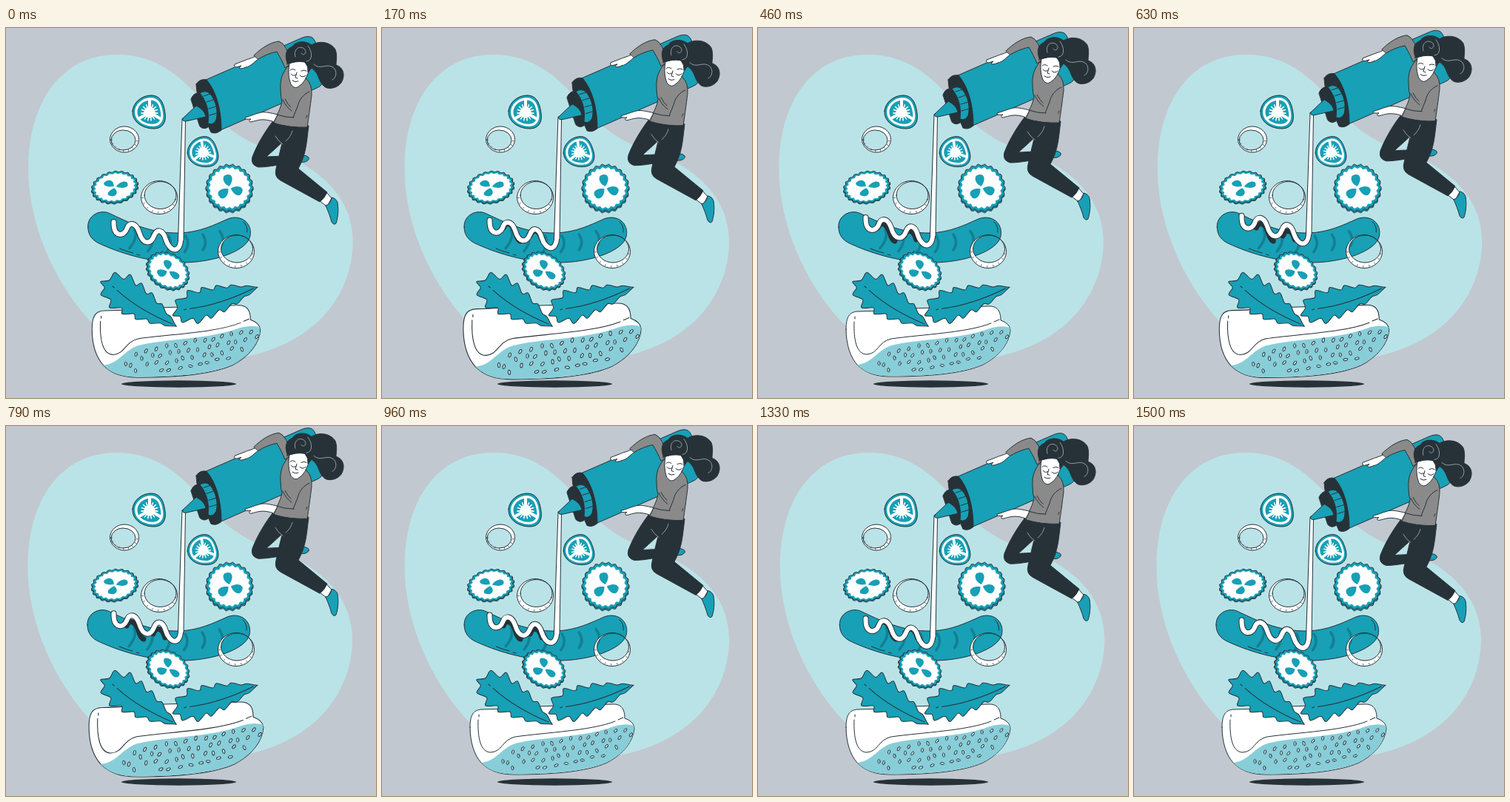
Animation of 500 by 500 pixels, one loop 1.54 s. Source, as an HTML page:

```html
<!DOCTYPE html>
<html lang="en">
<head>
<meta charset="utf-8">
<title>Hot dog</title>
<style>
html, body { margin: 0; width: 100%; height: 100%; overflow: hidden; background: #c2c8cf; }
svg { display: block; width: 100vw; height: 100vh; }
.ink { stroke: #263238; stroke-width: 1; stroke-linecap: round; stroke-linejoin: round; fill: none; }
.t { fill: #18a0b6; }
.w { fill: #fff; }
.d { fill: #263238; }
.g { fill: #8a8a8a; }
.n { stroke: none; }
</style>
</head>
<body>
<svg viewBox="0 0 500 500">
  <path id="blob" fill="#bae3e8" d="M30.5 190C30.5 100 75 36 150 36C205 36 236 66 268 100C288 128 318 152 355 164C425 186 469 230 469 288C469 350 430 420 330 443C240 462 165 450 118 400C70 350 30.5 270 30.5 190Z"/>
  <ellipse class="d" cx="233.5" cy="481" rx="77.5" ry="4.7"/>

  <g id="bun" class="ink">
    <path class="w" d="M119 407C119 391 123 383 136 383C160 383 182 380 205 379L310 376C324 375 328 383 328 395Q340 399 341 408C340 425 327 443 304 455C275 468 225 471 180 471C160 471 146 467 134 455C125 445 119 428 119 407Z"/>
    <path class="n" fill="#88ced9" d="M134 455C155 453 160 436 180 429C215 420 274 421 313 406Q330 401 340.500 405C341 424 327 443 304 454.500C275 467 225 470.500 180 470.500C160 470.500 146 467 134 455Z"/>
    <path d="M130 397C129 421 133 441 147 441C163 440 162 424 180 420C222 414 282 412 315 399"/>
    <path d="M319 397L326 394M131 390V393"/>
    <g id="seeds" fill="#bae3e8"></g>
  </g>

  <g id="sausage" class="ink">
    <path class="t" d="M111 269C110 254 126 245 139 250C165 262 195 278 235 277C262 276 282 266 300 258C318 251 334 264 330 282C325 302 280 317 238 317C190 317 150 302 128 292C116 287 111 279 111 269Z"/>
    <path id="stripes" stroke="#137f92" stroke-width="3.500"/>
    <path stroke-width="7" d="M164 270C167 262 175 262 180 276Q183 287 187 288M200 281C204 271 212 272 216 286"/>
    <path d="M154 298Q163 302 172 304M177 306L181 307M321 262Q327 267 326 276"/>
  </g>

  <g id="leaves" class="ink"></g>
  <g id="slices" class="ink"></g>

  <g id="float">
    <g class="ink">
      <path class="w" stroke-width="2" d="M238.500 123L233 286H239.500L242 123Z"/>
      <path id="sauce" stroke-width="8" d="M145.500 262C145 283 159 282 163 272C166 262 175 262 180 276C185 293 195 293 200 281C204 271 212 272 216 286C221 302 235 306 236.300 285"/>
      <use href="#sauce" id="cream"/>
      <path class="w n" d="M238.500 123L233 287H239.500L242 123Z"/>
    </g>

    <g class="ink">
      <path class="t" d="M270 70L396 15Q408 9 414 13Q419 17 421 30L430 66Q431 77 418 82L290 138C290 110 283 85 270 70Z"/>
      <path class="d" d="M257 76Q262 68 271 70C284 85 291 110 291 138Q284 144 277 141C268 120 258 100 257 76Z"/>
      <path class="d" d="M250 96Q253 87 264 87C273 99 278 116 273 134Q267 138 262 133Z"/>
      <path class="t" d="M262 88Q270 83 276 89C284 99 287 113 284 124Q280 132 273 129C275 112 271 99 262 88Z"/>
      <path d="M267 92L276 89M271 100L280 97M274 109L284 106M275 118L285 115"/>
      <path class="t" d="M239 122L257 105C265 109 269 114 270 120L243 126Q237 126 239 122Z"/>
    </g>

    <g class="ink">
      <path class="t" d="M397 172Q405 171 409 175Q411 178 404 181Q395 182 386 181Z"/>
      <path class="w" d="M381 174L398 172L389 181L378 183Z"/>
      <path class="d" d="M363 123C351 138 340 156 333 174Q330 185 341 188C356 188 372 184 390 181L397 172L352 174L377 151Z"/>
      <path fill="#bae3e8" class="n" d="M372 157C366 163 359 168 354 173Q361 171 368 172Z"/>
      <path class="w" d="M421 231L431 220L440 230L434 241Z"/>
      <path class="t" d="M432 240Q439 238 440 229Q446 230 448 236C450 248 448 258 446 264Q443 267 440 262C438 254 435 247 432 240Z"/>
      <path class="d" d="M363 124L409 132C406 155 406 170 395 190L434 222Q430 231 424 235L371 206Q362 201 365 190Q369 172 373 156Z"/>
      <path stroke="#c2c8cf" stroke-width=".7" d="M374 157Q368 153 364 146M387 139Q385 147 378 153"/>

      <path class="w" d="M341 36C333 41 329 41 322 44L309 49Q307 52 311 53L318 51L315 54Q318 56 324 53C331 52 335 46 342 41Z"/>
      <path class="g" d="M335 37C344 28 357 19 369 18Q380 22 385 48L377 54C374 46 370 39 366 32Q352 35 341 42Z"/>
      <path class="g" d="M384 49C374 58 370 69 371 83Q371 94 373 99C371 109 367 116 361 128Q384 135 407 134C409 122 411 106 413 91Q414 76 406 69L399 57Z"/>
      <path d="M374 97Q378 106 386 112M377 96Q381 104 385 107M410 86C403 89 396 96 394 106L388 121M407 118Q404 127 397 130"/>
      <path class="w" d="M368 117C357 115 349 112 341 115C334 117 330 119 323 121Q322 124 331 123Q326 126 331 127C340 125 346 121 363 127Z"/>
      <path class="g n" d="M367 116L389 121Q398 115 403 105L407 132Q382 135 361 127Z"/>
      <path d="M366 117Q378 121 389 121M367 117L362 128"/>
      <path class="w" d="M383 48C381 60 382 68 385 76Q389 82 394 80Q401 76 404 70L411 55L401 43Z"/>
      <path d="M384 57Q387 54 391 57M399 58Q403 56 406 58M385 62Q388 66 392 63M397 64Q401 68 405 64M393 60L391 67L394 68M387 71Q391 74 395 72"/>
      <path class="d" d="M380 47C377 38 377 29 387 25C391 18 404 16 413 23C422 17 438 18 445 29C448 37 446 45 446 50C456 53 459 64 453 74C447 82 434 84 429 78C421 70 424 62 413 54L408 60Q409 52 404 46Q391 44 380 49Z"/>
      <path stroke="#c2c8cf" stroke-width=".7" d="M391 39C388 29 396 23 403 28C408 33 402 39 399 34M406 45C414 45 415 33 408 24M416 49C425 58 434 46 443 54C448 59 446 68 441 70"/>
    </g>
  </g>
</svg>
<script>
const $ = id => document.getElementById(id);
const { sin, cos, PI, min, max, floor, abs } = Math;
const LOOP = 1540, LEAD = 38;

let seed = 7;
const rnd = () => (seed = seed * 16807 % 2147483647) / 2147483647;
const jit = r => (rnd() * 2 - 1) * r;

// closed smooth curve through a list of [x, y]
function smooth(pts) {
  const n = pts.length, at = i => pts[(i + n) % n];
  let d = `M${at(0)}`;
  for (let i = 0; i < n; i++) {
    const [a, b, c, e] = [at(i - 1), at(i), at(i + 1), at(i + 2)];
    const out = k => b[k] + (c[k] - a[k]) / 6, into = k => c[k] - (e[k] - b[k]) / 6;
    d += `C${out(0)} ${out(1)} ${into(0)} ${into(1)} ${c}`;
  }
  return d + 'Z';
}

// lobed leaf along a straight rib, lobes leaning back to the stem
function leaf(x, y, len, turn, width, lobes) {
  const edge = (u, side, k) => [u * len - 5 * (k > .9) * (1 - u),
    side * k * width * (1 - u ** 2.5) * (.55 + .45 * min(1, 5 * u))];
  const top = [], low = [];
  for (let i = 0; i < lobes; i++) {
    const u = (i + .3) / lobes;
    top.push(edge(u, -1, 1), edge(u + .55 / lobes, -1, .7));
    low.unshift(edge(u + .55 / lobes, 1, .7), edge(u, 1, 1));
  }
  const d = smooth([[-9, 3], [0, -5], ...top, [len, 0], ...low, [0, 7]]);
  return `<g transform="translate(${x} ${y}) rotate(${turn})"><path class="t" d="${d}"/>
    <path d="M8 0h3M16 1Q${len / 2} 8 ${len - 6} 0"/></g>`;
}
$('leaves').innerHTML = leaf(137, 345, 110, 32, 27, 6) + leaf(233, 383, 112, -17, 24, 6);

// staggered rows of seeds that follow the crust
let dots = '';
for (let row = 0; row < 4; row++)
  for (let x = 166 + row % 2 * 6; x < 337; x += 12.5) {
    const px = x + jit(2.5);
    const top = 432 - .18 * (px - 180) + max(0, 180 - px) * .7;
    const base = 465 - 38 * (max(0, px - 230) / 100) ** 2;
    const py = top + 5 + row * 10 + jit(2);
    const turn = row > 2 ? 80 + jit(20) : 10 + jit(35);
    if (py < base) dots += `<ellipse rx="1.500" ry="2.800" stroke-width=".9"
      transform="translate(${px} ${py}) rotate(${turn})"/>`;
  }
$('seeds').innerHTML = dots;

let bars = '';
for (let i = 0; i < 6; i++) {
  const x = 174 + i * 23, y = 281 - 20 * ((x - 235) / 95) ** 2;
  bars += `M${x} ${y}q${5 + i * .6} 11 ${i * 1.8 - 7} ${25 - i}`;
}
$('stripes').setAttribute('d', bars);
$('cream').style.stroke = '#fff';
$('cream').outerHTML = `<path stroke="#fff" stroke-width="6" d="${$('sauce').getAttribute('d')}"/>`;

function scallop(r, n, amp) {
  let d = '';
  for (let i = 0; i < n * 8; i++) {
    const a = i / (n * 4) * PI, q = r + amp * cos(a * n);
    d += `${i ? 'L' : 'M'}${q * cos(a)} ${q * sin(a)}`;
  }
  return d + 'Z';
}

function pickle(x, y, rx, ry, tilt, turn) {
  const rim = scallop(31, 22, 1.1);
  let petals = '';
  for (let a = turn; a < turn + 360; a += 120)
    petals += `<path class="t n" transform="rotate(${a})" d="M0 -2C-9 -8 -8 -18 -2 -18C7 -19 8 -10 0 -2Z"/>`;
  return `<g transform="translate(${x} ${y}) rotate(${tilt}) scale(${rx / 32} ${ry / 32})">
    <path class="t" transform="translate(0 2)" d="${rim}"/><path class="t" d="${rim}"/>
    <path class="w n" d="${scallop(27, 22, 1.1)}"/>${petals}</g>`;
}

function ring(x, y, rx, ry, dx, dy) {
  const oval = (cx, cy, a, b) => `M${cx - a} ${cy}a${a} ${b} 0 1 0 ${2 * a} 0a${a} ${b} 0 1 0 ${-2 * a} 0Z`;
  let marks = '';
  for (let a = .15; a < 3.2; a += .37)
    marks += `M${x + (rx - 1.5) * cos(a)} ${y + (ry - 1.5) * sin(a)}l${-1.5 * cos(a)} ${-1.5 * sin(a)}`;
  return `<path class="w" fill-rule="evenodd" d="${oval(x, y, rx, ry)}${oval(x + dx, y + dy, rx - 3, ry - 4)}"/>
    <path stroke-width=".8" d="${marks}"/>`;
}

function tomato(x, y, size, tilt) {
  const skin = 'M-23 -2C-22 -14 -10 -23 2 -23C14 -23 19 -14 21 1C23 14 17 22 6 22C-8 22 -24 14 -23 -2Z';
  const part = (k, cls) => `<path class="${cls}" d="${skin}" transform="scale(${k})"/>`;
  let core = '<circle class="w n" r="7.500"/>';
  for (let i = 0; i < 15; i++)
    core += `<path stroke="#fff" stroke-width="${i % 5 ? 1.6 : 4}" transform="rotate(${i * 24})" d="M0 -6V${i % 5 ? -11 : -17}"/>`;
  return `<g transform="translate(${x} ${y}) rotate(${tilt}) scale(${size})">
    ${part(1, 't')}${part(.86, 'w n')}${part(.72, 't n')}${core}</g>`;
}

$('slices').innerHTML = tomato(194, 114, 1, 0) + tomato(266.5, 168, .92, -8)
  + ring(160, 150.5, 19.5, 17.5, -1.5, 1) + ring(207, 229, 24.5, 22.5, 1.5, -3)
  + pickle(147, 215, 32, 21.5, -10, -35) + pickle(302, 216, 32, 32, 0, -8)
  + pickle(219, 328, 31, 23.5, 32, -25) + ring(311, 302, 24.5, 22.5, 1, -3.5);

// values at every tenth of the loop, joined by straight lines
const SHAKE = [0, -1, 2, -4, 4, -4, 4, -4, 2, -1, 0];
const BEAT = [1, 1.1, 1.05, 1, 1, 1.1, 1, 1, 1, 1, 1];
function tenths(p, v) {
  const i = min(9, floor(p * 10));
  return v[i] + (v[i + 1] - v[i]) * (p * 10 - i);
}

function draw(ms) {
  const p = (ms + LEAD) % LOOP / LOOP, move = `translate(${tenths(p, SHAKE)} 0)`;
  $('blob').setAttribute('transform', move);
  $('sausage').setAttribute('transform', move);
  $('bun').setAttribute('transform', `translate(230 424) scale(${tenths(p, BEAT)}) translate(-230 -424)`);
  $('float').setAttribute('transform', `translate(0 ${20 * abs(p - .5) - 9.5})`);
}

let start;
function tick(now) {
  start ??= now;
  draw(max(0, now - start));
  requestAnimationFrame(tick);
}
draw(0);
requestAnimationFrame(tick);
</script>
</body>
</html>
```
